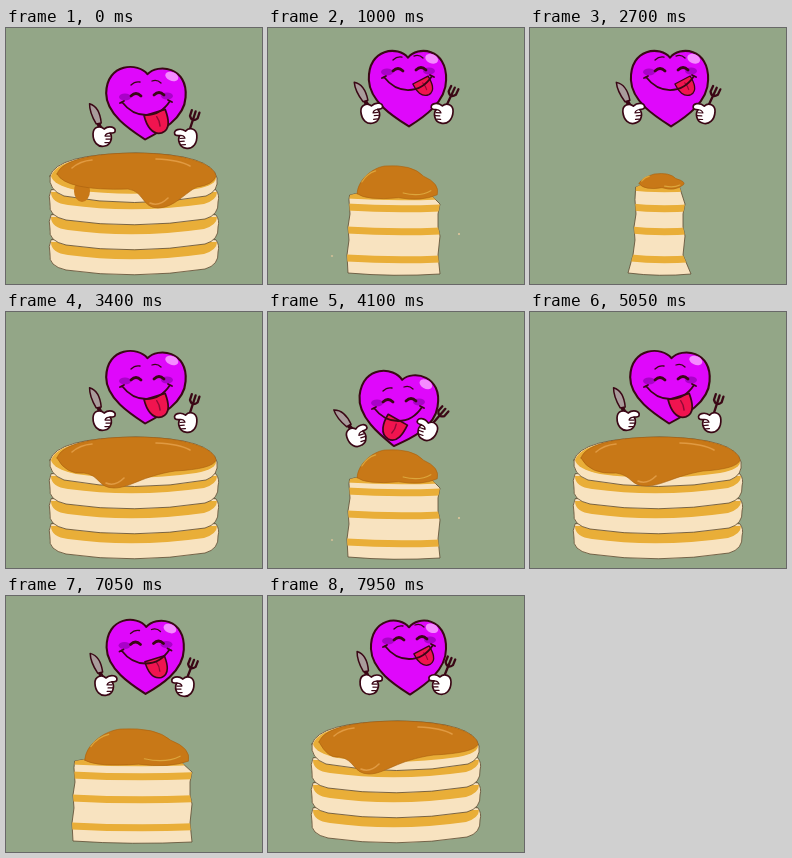
These frames come from a looping animation (256 px wide and 256 px high, 8000 ms). An HTML page with a canvas:

```html
<!DOCTYPE html>
<html lang="en">
<head>
<meta charset="utf-8">
<title>Heart eating pancakes</title>
<style>
html, body { margin: 0; width: 100%; height: 100%; overflow: hidden; background: #93a687; }
canvas { display: block; width: 100vw; height: 100vh; }
</style>
</head>
<body>
<canvas id="stage" width="256" height="256"></canvas>
<script>
const ctx = document.getElementById('stage').getContext('2d');
const LOOP = 8000, STEP = 50, REST = 150;
const INK = '#3a0715', PURPLE = '#df08fb', CREAM = '#f8e3c0', BUTTER = '#e9ae38', SYRUP = '#c87817', CRUST = '#5c4a30';
ctx.lineCap = ctx.lineJoin = 'round';

function draw(d, fill, stroke, width = 1) {
  const path = new Path2D(d);
  if (fill) { ctx.fillStyle = fill; ctx.fill(path); }
  if (stroke) { ctx.strokeStyle = stroke; ctx.lineWidth = width; ctx.stroke(path); }
}

function oval(x, y, rx, ry, fill, turn = 0) {
  ctx.beginPath();
  ctx.ellipse(x, y, rx, ry, turn, 0, 7);
  ctx.fillStyle = fill;
  ctx.fill();
}

function at(x, y, deg, sx, sy, paint) {
  ctx.save();
  ctx.translate(x, y);
  ctx.rotate(deg * Math.PI / 180);
  ctx.scale(sx, sy);
  paint();
  ctx.restore();
}

// Pancakes

function layer(m) {
  draw(`M45,${m - 14}Q42,${m - 8} 44,${m}Q42,${m + 12} 60,${m + 16}Q128,${m + 26} 199,${m + 15}
    Q213,${m + 11} 212,${m - 2}Q214,${m - 9} 210,${m - 14}Z`, CREAM, CRUST, 0.8);
  draw(`M45,${m - 12}Q45,${m - 1} 62,${m + 1}Q128,${m + 10} 198,${m}Q211,${m - 4} 211,${m - 12}Z`, BUTTER);
}

function fullStack(drip, bottom, leftDrip) {
  [226, 201, 176].forEach(layer);
  draw('M44,148Q42,162 58,168Q128,181 200,168Q213,163 211,150Q206,126 130,125Q50,126 44,148Z', CREAM, CRUST, 0.8);
  draw('M45,148Q47,157 70,162Q128,170 190,161Q211,157 210,149Q204,126 130,126Q52,127 45,148Z', BUTTER);
  if (leftDrip) oval(76, 163, 8, 11, SYRUP);
  draw(`M51,146C56,130 95,125 130,125C175,125 208,135 210,148Q207,157 ${(drip + 230) / 2},159
    C${drip + 28},164 ${drip + 16},${bottom} ${drip},${bottom}C${drip - 16},${bottom} ${drip - 14},163 ${drip - 30},161
    Q60,163 51,146Z`, SYRUP, '#a8610f', 0.6);
  draw(`M${drip - 8},${bottom - 5}q9,4 18,-5M150,131q24,1 34,7M66,140q8,-7 20,-8`, null, '#e09a42', 1.6);
}

function bittenStack({ l, r, top, dome, flare = 0, crumbs }) {
  const w = r - l, base = top + dome;
  const seams = [base - 3, 176, 199, 227].filter(y => y >= base - 3);
  const body = `M${l + 2},${base}Q${l + w * .3},${base - 7} ${r - w * .12},${base - 2}L${r},176L${r - 2},186L${r - 2},199
    L${r},208L${r - 2},227L${r + flare},246Q${l + w / 2},249 ${l - flare},245L${l - 1},227L${l + 1},212L${l},199L${l + 2},186L${l + 1},172Z`;
  draw(body, CREAM, CRUST, 0.8);
  ctx.save();
  ctx.clip(new Path2D(body));
  for (const y of seams) {
    draw(`M${l - 8},${y - 1}Q${l + w / 2},${y + 3} ${r + 8},${y}v7Q${l + w / 2},${y + 10} ${l - 8},${y + 6}Z`, BUTTER);
  }
  ctx.restore();
  const a = l + w * .1, b = r - w * .03, low = base + dome * .13;
  draw(`M${a},${low - 5}C${a},${low - dome * .6} ${l + w * .25},${top + 2} ${l + w * .4},${top}
    Q${l + w * .7},${top - 2} ${l + w * .82},${top + dome * .35}Q${b + 3},${top + dome * .6} ${b},${low - 4}
    Q${l + w * .8},${low + 3} ${l + w * .55},${low - 1}Q${l + w * .2},${low + 2} ${a},${low - 5}Z`, SYRUP, '#a8610f', 0.6);
  draw(`M${l + w * .15},${top + dome * .55}q${w * .06},${-dome * .3} ${w * .15},${-dome * .38}
    M${l + w * .6},${low - dome * .2}q${w * .18},${dome * .15} ${w * .3},${-dome * .08}`, null, '#dca53c', 1.2);
  if (crumbs) {
    oval(64, 228, 1.2, .8, '#e5c79c');
    oval(191, 206, 1, 1, '#e5c79c');
  }
}

const meal = [
  () => fullStack(152, 180, true),
  () => fullStack(101, 178),
  () => fullStack(108, 176),
  () => fullStack(116, 174),
  () => fullStack(124, 174),
  () => bittenStack({ l: 54, r: 201, top: 129, dome: 33 }),
  () => bittenStack({ l: 67, r: 186, top: 133, dome: 32 }),
  () => bittenStack({ l: 80, r: 172, top: 138, dome: 29, crumbs: true }),
  () => bittenStack({ l: 104, r: 155, top: 146, dome: 13, flare: 6 }),
  () => bittenStack({ l: 117, r: 144, top: 188, dome: 8, flare: 3 }),
  () => {},
  () => {}
];
const MEAL = 1550;

// Heart. Columns: progress; x, y, tilt, width, height; face y; tongue x, y, turn, size;
// then x, y, turn of the knife hand and of the fork hand.

const rest = [140, 75, 3, 1.06, .96, 0, 9, 11, -14, 1, -43, 33, 1, 41, 35, -4];
const hover = [140, 60, 0, 1.03, 1.01, -10, 13, 3, -25, .78, -37, 25, -5, 35, 25, 3];
const poses = [
  [0, ...rest],
  [.2, 139, 46, 0, 1, 1.01, -10, 10, 6, -15, .85, -38, 24, -4, 36, 24, 2],
  [.424, 130, 97, 8, 1.05, .98, 0, -1, 12, 32, 1, -41, 27, -18, 29, 21, 19],
  [.548, 139, 63, 0, 1.03, 1.01, -9, 11, 4, -15, .85, -34, 21, -10, 35, 22, 2],
  [.64, ...hover],
  [.69, 141, 61, 0, 1, .99, -10, 13, 4, -25, .78, -39, 27, 2, 32, 27, 0],
  [.86, ...hover],
  [1, ...rest]
];

const starts = [-1650, 50, 1700, 3400, 5200, 6900, 8550];

function poseAt(t) {
  const c = starts.findLastIndex(s => s <= t);
  const u = Math.min(1, (t - starts[c]) / (starts[c + 1] - starts[c] - REST));
  const i = Math.max(1, poses.findIndex(p => p[0] >= u));
  const a = poses[i - 1], b = poses[i];
  const k = (u - a[0]) / (b[0] - a[0]), e = k * k * (3 - 2 * k);
  return a.map((v, j) => v + (b[j] - v) * e).slice(1);
}

function glove() {
  draw('M-10,-2C-10,-9 -3,-11 1,-7C6,-11 13,-9 12,-5C12,-3 9,-3 7,-3C10,1 8,9 2,10C-5,12 -10,6 -10,-2Z', '#fff', INK, 1.7);
  draw('M7,-3Q3,-3 2,0h5M3,3h5M2,6.5h4', null, INK, 1.2);
}

function knife() {
  draw('M-2,-6L-5,-13', null, INK, 4);
  draw('M-7,-12C-12,-20 -14,-26 -14,-32C-7,-30 -3,-22 -2,-13Z', '#a99c9b', INK, 1.5);
  glove();
}

function fork() {
  at(0, 0, 22, 1, 1, () => draw('M0,-7V-28M-4,-28V-22Q0,-16 4,-22V-28', null, INK, 2.3));
  at(0, 0, 0, -1, 1, glove);
}

function face(tongueX, tongueY, tongueTurn, tongueSize) {
  oval(-21, -6, 6, 3.5, '#a902c8');
  oval(21, -7, 6, 3.5, '#a902c8');
  draw('M-15,-7q5,-5 10,0M8,-8q5,-5 10,0', null, INK, 2.8);
  draw('M-15,-18q4,-4 9,-3M6,-22q5,-2 9,2', null, INK, 1.3);
  at(tongueX, tongueY, tongueTurn, tongueSize, tongueSize, () => {
    draw('M-11,-1C-11,9 -8,20 2,20C12,19 12,7 11,-2Z', '#f0144f', INK, 1.7);
    draw('M1,3Q3,8 2,13', null, '#8f0a35', 1.4);
  });
  draw('M-24,-1Q-14,12 0,12Q15,12 24,-2M-26,0l4,-2M22,-3l4,2', null, INK, 1.8);
}

function heart(t) {
  const [x, y, tilt, sx, sy, faceY, tx, ty, tr, ts, lx, ly, lr, rx, ry, rr] = poseAt(t);
  at(x, y, tilt, sx, sy, () => {
    draw('M0,-30C-9,-42 -39,-40 -38,-8C-37,14 -13,29 1,38C15,29 37,14 37,-8C38,-40 9,-42 0,-30Z', PURPLE, INK, 2);
    oval(23, -29, 6.5, 4.5, '#f58bff', .4);
  });
  at(x, y + faceY, 0, 1, 1, () => face(tx, ty, tr, ts));
  at(x + lx, y + ly, lr, 1, 1, knife);
  at(x + rx, y + ry, rr, 1, 1, fork);
}

function frame(now) {
  const t = Math.floor(now % LOOP / STEP) * STEP;
  ctx.fillStyle = '#93a687';
  ctx.fillRect(0, 0, 256, 256);
  meal[Math.floor(t % MEAL / MEAL * meal.length)]();
  heart(t);
}

let begin;
function tick(now) {
  begin ??= now;
  frame(now - begin);
  requestAnimationFrame(tick);
}
frame(0);
requestAnimationFrame(tick);
</script>
</body>
</html>
```
